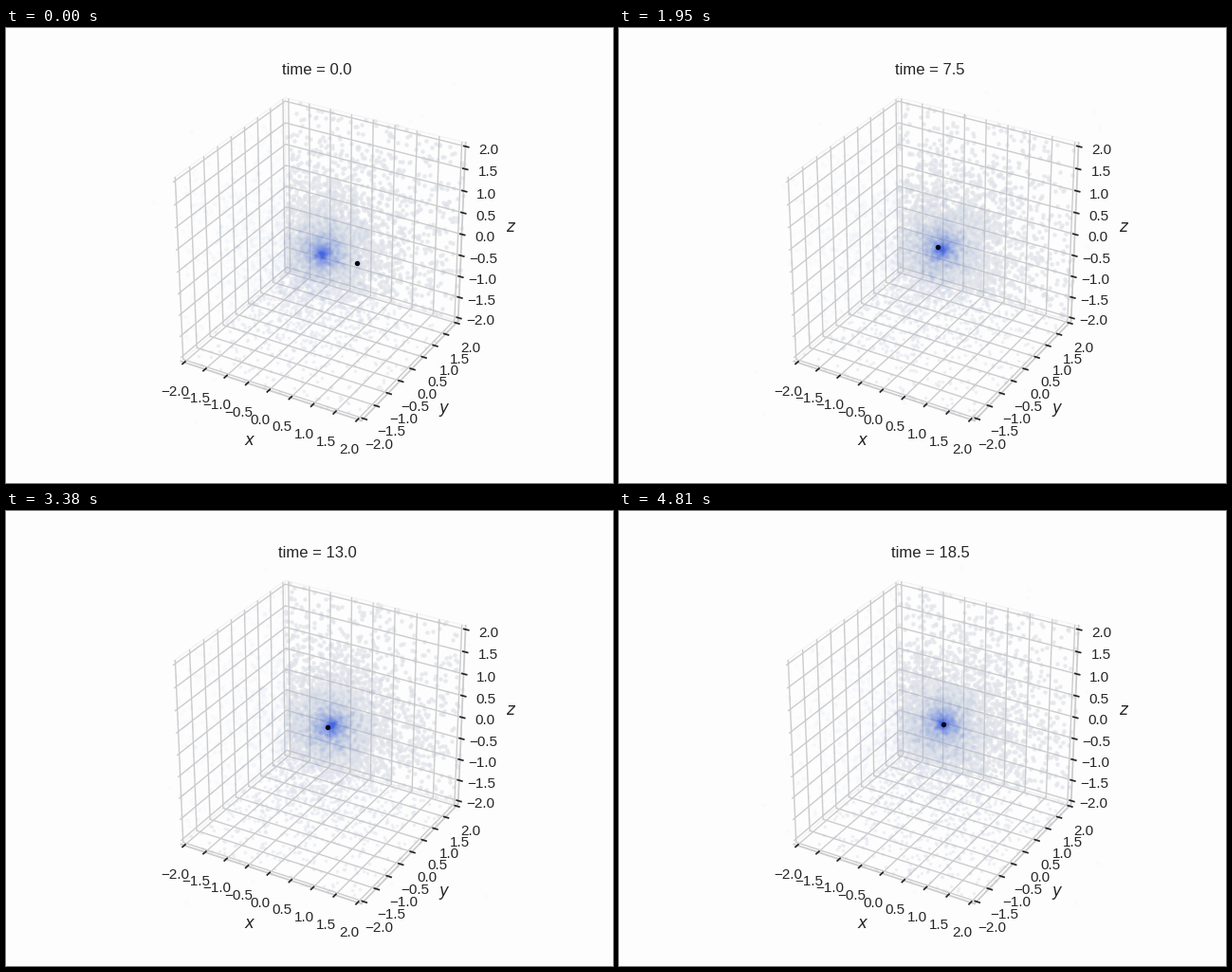
Animation, 640 px wide and 480 px high, one loop 4.94 s. Source, as a matplotlib script:

```python
import numpy as np
import matplotlib.pyplot as plt
from matplotlib.animation import FuncAnimation
from matplotlib.path import Path
from mpl_toolkits.mplot3d import proj3d

W, H, DPI = 640, 480, 100
FRAMES, INTERVAL, DT = 38, 130, 0.5
N, SCALE, SPEED = 8000, 0.6, 0.55
LIM = 2 + 4 / 48
INK = "0.15"

plt.rcParams.update({
    "font.family": "Liberation Sans",
    "text.color": INK, "axes.labelcolor": INK,
    "xtick.color": INK, "ytick.color": INK,
    "axes.edgecolor": "0.8", "axes.linewidth": 1.25,
    "grid.color": "0.8", "grid.linewidth": 1.0,
    "xtick.major.width": 1.25, "ytick.major.width": 1.25,
    "axes.labelsize": 12,
    "axes3d.automargin": True,
})

fig = plt.figure(figsize=(W / DPI, H / DPI), dpi=DPI, facecolor="#fdfdfd")


def pixel_layer(zorder):
    layer = fig.add_axes([0, 0, 1, 1], zorder=zorder)
    layer.set(xlim=(0, W), ylim=(0, H))
    layer.axis("off")
    return layer


def dots(layer, size, color, alpha=1):
    return layer.plot([], [], "o", ms=size, mew=0, color=color, alpha=alpha)[0]


# Cube with ticks and grid
ax = fig.add_subplot(projection="3d", zorder=1)
ax.set_facecolor("none")
ax.set_box_aspect((1, 1, 1))
ax.view_init(30, -60)
ax.set_xlim(-2, 2)
ax.set_ylim(-2, 2)
ax.set_zlim(-2, 2)
ax.set_xlabel("$x$")
ax.set_ylabel("$y$")
ax.set_zlabel("$z$")
ax.tick_params(labelsize=11)
for axis in (ax.xaxis, ax.yaxis, ax.zaxis):
    axis.pane.fill = False
    axis.pane.set_edgecolor("#ececf0")

back, front = pixel_layer(0), pixel_layer(2)
title = front.text(328, 431, "time = 0.0", size=12, ha="center")
wall_dots = dots(back, 3.2, "#ebecee")
floor_dots = dots(back, 2.2, "#f2f2f4")
halo = dots(front, 3.1, "royalblue", 0.018)
body = dots(front, 3.9, "#02061a")

fig.draw_without_rendering()
proj = ax.get_proj()
box = ax.get_position().transformed(fig.transFigure)


def project(p):
    x, y, _ = proj3d.proj_transform(*np.asarray(p, float).T, proj)
    return ax.transData.transform(np.column_stack([x, y]))


def pane(axis, value):
    """Pixel outline of one back face of the cube."""
    square = LIM * np.array([(-1, -1), (1, -1), (1, 1), (-1, 1)])
    return Path(project(np.insert(square, axis, value, axis=1)))


left, wall, floor = pane(0, -LIM), pane(1, LIM), pane(2, -LIM)

# Centrally concentrated halo on randomly tilted orbits
rng = np.random.default_rng(4)


def unit(v):
    return v / np.linalg.norm(v, axis=1, keepdims=True)


root = np.sqrt(rng.uniform(0, 0.95, N))
radius = SCALE * root / (1 - root)
e1 = unit(rng.normal(size=(N, 3)))
e2 = unit(np.cross(e1, rng.normal(size=(N, 3))))
phase = rng.uniform(0, 2 * np.pi, N)
omega = SPEED / (np.sqrt(radius + 1e-3) * (radius + SCALE))
follow = 1 / (1 + (radius / 1.2) ** 2)
stray = np.arange(N) % 25 == 0

KEYS = [0, 2, 4.5, 7.5, 11.5, 15, 18.5]
CORE_X = [0, 0.09, 0.08, 0.03, -0.03, -0.08, -0.12]
CORE_Y = [0, 0.03, 0.30, 0.22, 0.42, 0.48, 0.53]


def halo_at(t):
    angle = (phase + omega * t)[:, None]
    core = np.array([np.interp(t, KEYS, CORE_X), np.interp(t, KEYS, CORE_Y), 0])
    orbit = radius[:, None] * (e1 * np.cos(angle) + e2 * np.sin(angle))
    return orbit + follow[:, None] * core


def body_at(t):
    """Inspiral onto a slowly drifting centre."""
    r = 0.8 / (1 + (t / 3.5) ** 5)
    angle = 0.395 * t + 0.0827 * t * t
    return [[r * np.cos(angle) - 0.09 * (1 - np.exp(-t / 4)),
             r * np.sin(angle) + 0.0278 * t, 0]]


def draw(i):
    t = i * DT
    p = project(halo_at(t))
    on_wall, on_floor = wall.contains_points(p), floor.contains_points(p)
    inside = on_wall | on_floor | left.contains_points(p) | stray
    in_box = ((p > box.min) & (p < box.max)).all(axis=1)
    wall_dots.set_data(*p[on_wall].T)
    floor_dots.set_data(*p[on_floor].T)
    halo.set_data(*p[inside & in_box].T)
    body.set_data(*project(body_at(t)).T)
    title.set_text(f"time = {t:.1f}")
    return wall_dots, floor_dots, halo, body, title


anim = FuncAnimation(fig, draw, frames=FRAMES, interval=INTERVAL,
                     repeat=True, repeat_delay=0, blit=False)
plt.show()
```
